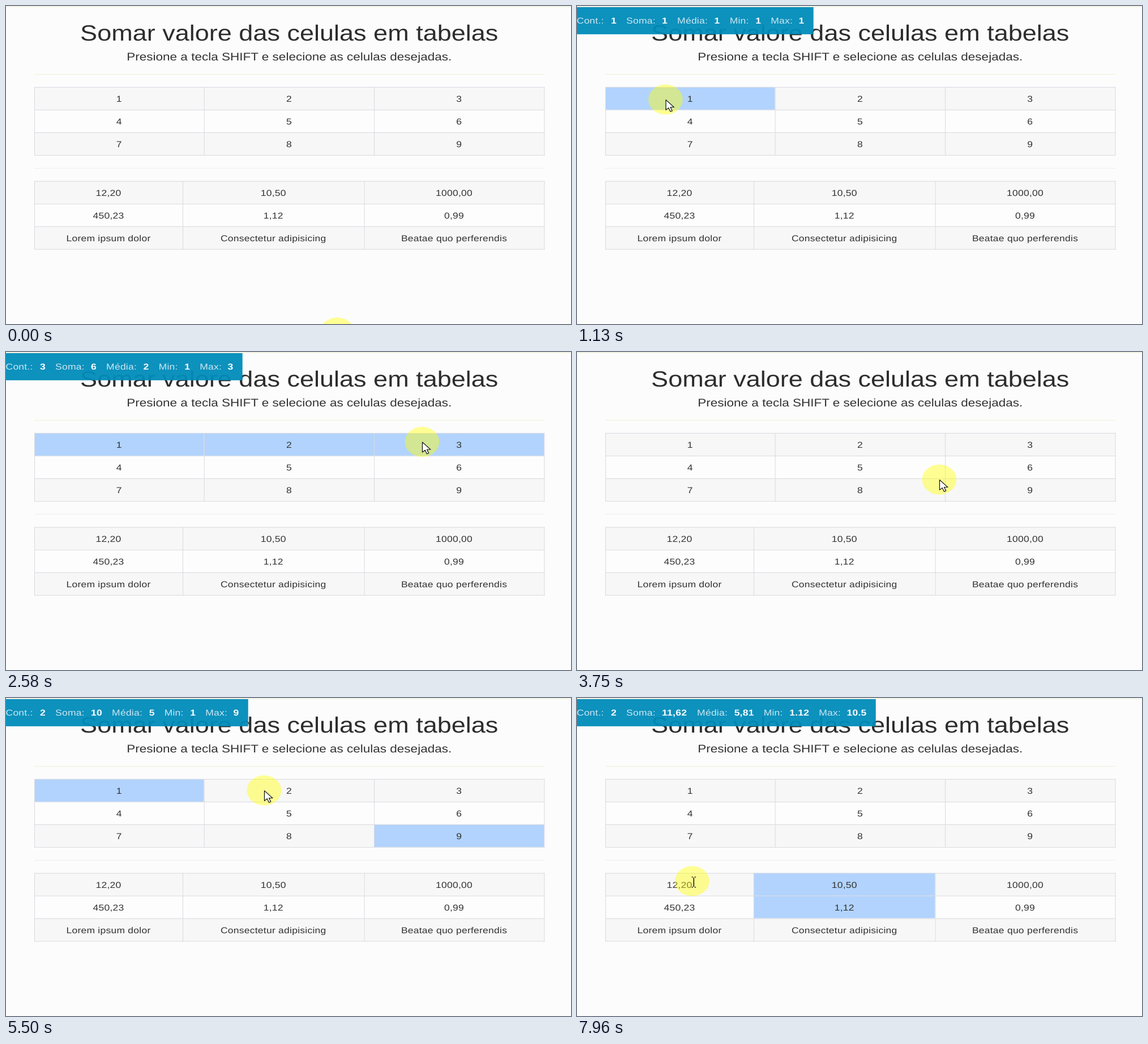
These frames come from a looping animation (998 by 561 pixels, 8 s). An HTML page:

```html
<!DOCTYPE html>
<html lang="pt">
<head>
<meta charset="utf-8">
<title>Somar celulas</title>
<style>
  html, body { margin: 0; width: 100%; height: 100%; overflow: hidden; background: #fcfcfc; }
  svg { display: block; width: 998px; height: 561px; }
  text { font: 14px "Liberation Sans", Arial, sans-serif; fill: #333; letter-spacing: .19px; text-rendering: geometricPrecision; }
  .mid { text-anchor: middle; }
  .title { font-size: 36px; fill: #2d2d2d; letter-spacing: 0; }
  .sub { font-size: 18px; letter-spacing: 0; }
  .bar rect { fill: #008cba; fill-opacity: .95; }
  .bar text { fill: #cde7f1; }
  .bar .val { fill: #fff; font-weight: bold; }
</style>
</head>
<body>
<!-- A 798 x 519 page shown on a wider stage -->
<svg id="page" viewBox="0 0 798 519" preserveAspectRatio="none"></svg>
<script>
const LOOP = 8000;
const SX = 998 / 798, SY = 561 / 519;
const page = document.getElementById('page');

function add(tag, attrs, parent = page, text = '') {
  const el = document.createElementNS('http://www.w3.org/2000/svg', tag);
  for (const k in attrs) el.setAttribute(k, attrs[k]);
  el.textContent = text;
  parent.appendChild(el);
  return el;
}
const box = (x, y, width, height, fill, parent) => add('rect', { x, y, width, height, fill }, parent);

box(0, .6, 798, .9, '#e9e9cd');
add('text', { x: 400, y: 56.4, class: 'mid title' }, page, 'Somar valore das celulas em tabelas');
add('text', { x: 400, y: 88.4, class: 'mid sub' }, page, 'Presione a tecla SHIFT e selecione as celulas desejadas.');
box(40, 111.2, 721, .95, '#f1f1d4');
box(40, 264.4, 721, .95, '#eeeef0');

// Tables
const cells = [];
function table(top, cols, rows) {
  const line = '#dadae1';
  rows.forEach((row, r) => row.forEach((label, c) => {
    const x = cols[c], y = top + r * 37, w = cols[c + 1] - x;
    const base = r % 2 ? '#fdfdfd' : '#f7f7f7';
    const rect = box(x, y, w, 37, base);
    const text = add('text', { x: x + w / 2, y: y + 24, class: 'mid' }, page, label);
    cells.push({ rect, text, base, value: parseFloat(label.replace(',', '.')) });
  }));
  for (let r = 0; r < 4; r++) box(cols[0], top + r * 37, cols[3] - cols[0] + .8, .95, line);
  for (const x of cols) box(x, top, .8, 112, line);
}
table(132.2, [40, 279.6, 519.8, 760], [['1', '2', '3'], ['4', '5', '6'], ['7', '8', '9']]);
table(285.6, [40, 249.4, 505.8, 760], [
  ['12,20', '10,50', '1000,00'],
  ['450,23', '1,12', '0,99'],
  ['Lorem ipsum dolor', 'Consectetur adipisicing', 'Beatae quo perferendis']
]);

// Totals bar: label and the room it takes
const bar = add('g', { class: 'bar' });
const barBox = box(0, 1.85, 0, 44.3, '#008cba', bar);
const fields = [['Cont.:', 48], ['Soma:', 50], ['Média:', 52], ['Min:', 36], ['Max:', 39]].map(([label, room]) => ({
  room,
  label: add('text', { y: 29 }, bar, label),
  val: add('text', { y: 29, class: 'val' }, bar)
}));

function showTotals(picked) {
  bar.style.display = picked.length ? '' : 'none';
  if (!picked.length) return;
  const nums = picked.map(i => cells[i].value);
  const sum = nums.reduce((a, b) => a + b, 0);
  const comma = n => String(+n.toFixed(2)).replace('.', ',');
  const out = [nums.length, comma(sum), comma(sum / nums.length), Math.min(...nums), Math.max(...nums)];
  let x = 0;
  fields.forEach((f, i) => {
    const s = String(out[i]);
    f.label.setAttribute('x', x - .4);
    x += f.room;
    f.val.setAttribute('x', x);
    f.val.textContent = s;
    x += 14;
    for (const ch of s) x += /\d/.test(ch) ? 8 : 4;
  });
  barBox.setAttribute('width', x - 1);
}

// Pointer
const pointer = add('g', {});
add('ellipse', { rx: 24.3, ry: 24.5, fill: '#ff0', 'fill-opacity': .42 }, pointer);
const arrow = add('path', {
  d: 'M.4 .6V17L4.2 13.5L6.8 19.6L9.4 18.5L6.8 12.5H12Z',
  fill: '#fff', stroke: '#111', 'stroke-width': 1, 'stroke-linejoin': 'round'
}, pointer);
const beam = add('path', {
  d: 'M-.6 -6.5H1.4M3.4 -6.5H5.4M2.4 -5.8V9.2M-.6 10H1.4M3.4 10H5.4',
  fill: 'none', stroke: '#111', 'stroke-width': 1.2
}, pointer);

// time, x, y on the stage
const path = [
  [130, 585, 576], [920, 156.5, 165], [1130, 156.5, 165], [1880, 440, 162], [1970, 448, 162],
  [2380, 735, 158.5], [2600, 735, 158.5], [3290, 590, 219], [3420, 590, 219], [3750, 640, 225],
  [4090, 752, 243], [4250, 752, 243], [4900, 190, 166], [5060, 190, 166], [5500, 456, 163],
  [5600, 458, 165], [6150, 423.5, 333], [6420, 423.5, 333], [6720, 410, 358], [6860, 410, 358],
  [7260, 808, 352], [7560, 679, 358], [7960, 203.3, 323]
];
const picks = [
  [0, []], [1000, [0]], [1950, [0, 1]], [2580, [0, 1, 2]], [3420, []], [4100, [8]],
  [4960, [8, 0]], [5600, []], [6200, [10]], [6840, [10, 13]]
];

function place(t) {
  const i = path.findIndex(k => k[0] > t);
  if (i === 0) return path[0].slice(1);
  if (i < 0) return path[path.length - 1].slice(1);
  const [t0, x0, y0] = path[i - 1], [t1, x1, y1] = path[i];
  const p = (1 - Math.cos(Math.PI * (t - t0) / (t1 - t0))) / 2;
  return [x0 + (x1 - x0) * p, y0 + (y1 - y0) * p];
}

const areas = cells.map(c => c.text.getBBox());
let current = null;

function draw() {
  const t = performance.now() % LOOP;
  const picked = picks.filter(s => s[0] <= t).pop()[1];
  if (picked !== current) {
    current = picked;
    cells.forEach((c, i) => c.rect.setAttribute('fill', picked.includes(i) ? '#b1d3fd' : c.base));
    showTotals(picked);
  }
  const [sx, sy] = place(t), x = sx / SX, y = sy / SY;
  pointer.setAttribute('transform', `translate(${x} ${y})`);
  const overText = areas.some(a => x > a.x - 2 && x < a.x + a.width + 2 && y > a.y && y < a.y + a.height);
  arrow.style.display = overText ? 'none' : '';
  beam.style.display = overText ? '' : 'none';
  requestAnimationFrame(draw);
}
draw();
</script>
</body>
</html>
```
